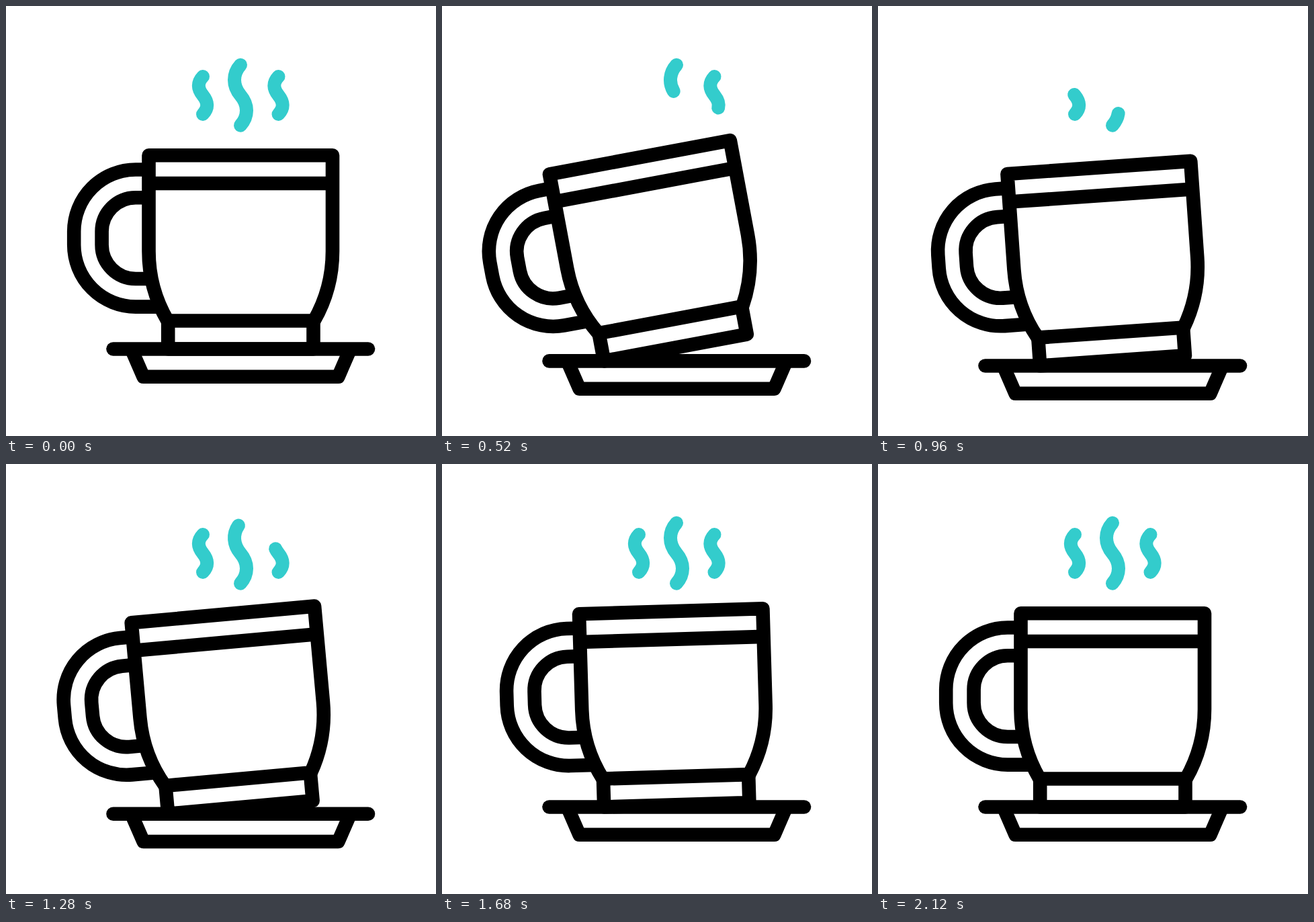
Write an HTML page that moves like this. It is 640 by 640 pixels and loops after 2200 ms.

```html
<!DOCTYPE html>
<html lang="en">
<head>
<meta charset="utf-8">
<title>Rocking cup</title>
<style>
  html, body { margin: 0; width: 100%; height: 100%; overflow: hidden; background: #fff; }
  svg { display: block; width: 100vw; height: 100vh; }
  path { fill: none; stroke: #000; stroke-width: 20.6; stroke-linejoin: round; }
  .steam path { stroke: #33cccc; stroke-width: 20; stroke-linecap: round; }
  .round { stroke-linecap: round; }
</style>
</head>
<body>
<svg viewBox="0 0 640 640">
  <g class="steam">
    <path pathLength="1" d="M293 105C284.5 114 285 123 293 133C301 143 301.5 152 293 161"/>
    <path pathLength="1" d="M349 87.7C337 101 337 119 349 133C361 147 361 164 349 177.7"/>
    <path pathLength="1" d="M405.5 105C397 114 397.5 123 405.5 133C413.5 143 414 152 405.5 161"/>
  </g>
  <g id="saucer">
    <path class="round" d="M159.5 510.5H539"/>
    <path d="M186.5 510.5L204.5 551.8H494.5L512.5 510.5"/>
  </g>
  <g id="cup">
    <path d="M212.5 222.3H486V365C486 402 476.5 437 458.5 468.5H240.5C222 437 212.5 402 212.5 365Z"/>
    <path d="M212.5 264H486"/>
    <path d="M241.2 468.5V510.5H457.5V468.5"/>
    <path d="M212.5 243.5H193A92 92 0 0 0 101.2 335.5V355.5A92 92 0 0 0 193 447.6H229"/>
    <path d="M212.5 285.2H193A50.4 50.4 0 0 0 142.6 335.6V355.6A50.4 50.4 0 0 0 193 406H217"/>
  </g>
</svg>
<script>
const LOOP = 2200, STEP = 40;
const cup = document.getElementById('cup');
const saucer = document.getElementById('saucer');
const wisps = [...document.querySelectorAll('.steam path')];
const delays = [0, 125, 280];

const unit = (t, from, to) => Math.min(1, Math.max(0, (t - from) / (to - from)));
const smooth = x => x * x * (3 - 2 * x);

// [time, depth] of the saucer
const sink = [[80, 0], [240, 2.4], [520, 17.9], [600, 22.5], [810, 26.5],
  [960, 25], [1160, 18.1], [1280, 10.2], [1560, 0]];

// Monotone cubic through the keys
function curve(keys, t) {
  const last = keys.length - 1;
  if (t <= keys[0][0]) return keys[0][1];
  if (t >= keys[last][0]) return keys[last][1];
  const rate = i => (keys[i + 1][1] - keys[i][1]) / (keys[i + 1][0] - keys[i][0]);
  const slope = i => {
    if (i === 0 || i === last) return 0;
    const a = rate(i - 1), b = rate(i);
    return a * b > 0 ? 2 * a * b / (a + b) : 0;
  };
  const i = keys.findIndex(k => k[0] > t) - 1;
  const [t0, v0] = keys[i], [t1, v1] = keys[i + 1];
  const d = t1 - t0, x = (t - t0) / d;
  return v0 + (v1 - v0) * smooth(x)
    + d * x * (1 - x) * (slope(i) * (1 - x) - slope(i + 1) * x);
}

// One rock: slows down towards the peak, then drops back
function rock(t, from, peak, to, height) {
  if (t <= from || t >= to) return 0;
  const x = (t - peak) / (t < peak ? peak - from : to - peak);
  return height * (1 - x * x);
}

function tilt(t) {
  if (t < 367) return 11.85 * smooth(unit(t, 70, 367));
  if (t < 840) return rock(t, 0, 367, 840, 11.85);
  return rock(t, 840, 1120, 1560, 5.95) + rock(t, 1560, 1800, 2120, 2.25);
}

function trim(path, t) {
  const gone = unit(t, 43, 508) ** 2;
  const grown = smooth(unit(t, 675, 1230));
  const start = gone < 1 ? 0 : 1 - grown;
  const length = gone < 1 ? 1 - gone : grown;
  path.style.visibility = length < 0.004 ? 'hidden' : 'visible';
  path.setAttribute('stroke-dasharray', `${length} 3`);
  path.setAttribute('stroke-dashoffset', -start);
}

function draw(ms) {
  let t = Math.min(Math.floor(ms / STEP) * STEP, LOOP - 2 * STEP);
  if (t < 2 * STEP) t = 0;
  const y = curve(sink, t);
  saucer.setAttribute('transform', `translate(0 ${y})`);
  cup.setAttribute('transform', `translate(0 ${y}) rotate(${-tilt(t)} 241 510.5)`);
  wisps.forEach((path, i) => trim(path, t - delays[i]));
}

const begin = performance.now();
function tick() {
  draw((performance.now() - begin) % LOOP);
  requestAnimationFrame(tick);
}
tick();
</script>
</body>
</html>
```
